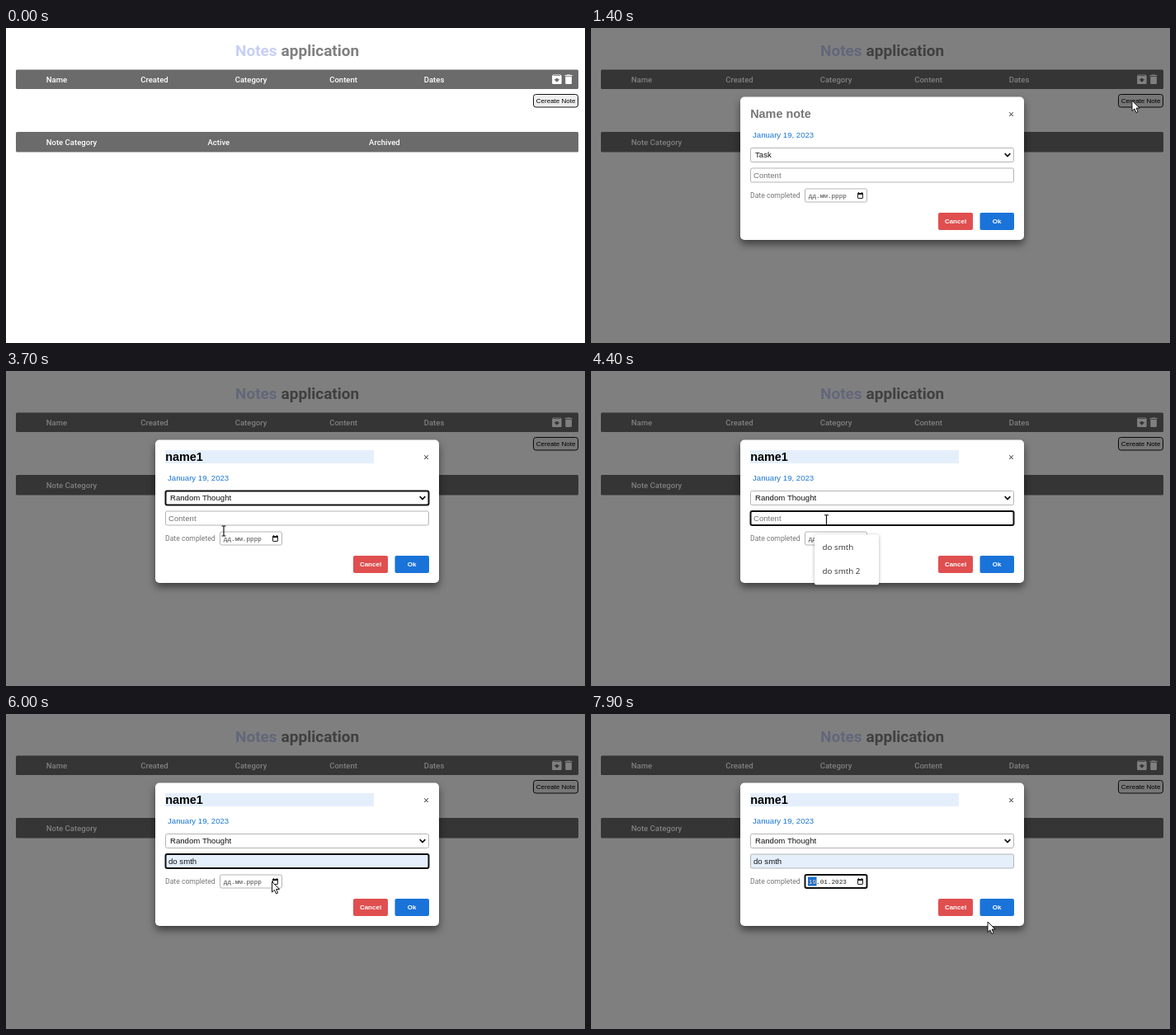
An HTML page with a canvas that plays this animation: 702 by 382 pixels, repeating every 8 s.

```html
<!DOCTYPE html>
<html lang="en">
<head>
<meta charset="utf-8">
<title>Notes application</title>
<style>
html, body { margin: 0; width: 100%; height: 100%; overflow: hidden; background: #fff; }
canvas { display: block; width: 702px; height: 382px; }
</style>
</head>
<body>
<canvas id="stage"></canvas>
<script>
const W = 702, H = 382, LOOP = 8000, STEP = 100;
const canvas = document.getElementById('stage');
const ratio = window.devicePixelRatio || 1;
canvas.width = W * ratio;
canvas.height = H * ratio;
const ctx = canvas.getContext('2d');

const ARIAL = '"Liberation Sans", Arial, sans-serif';
const ROBOTO = 'Roboto, sans-serif';
const MENU = '"Open Sans", sans-serif';
const MONO = '"Liberation Mono", monospace';
const FILLED = '#e5effc', BLUE = '#1a73d9', GREY = '#757575';

const archiveIcon = new Path2D('M20.54 5.23l-1.39-1.68C18.88 3.21 18.47 3 18 3H6c-.47 0-.88.21-1.16.55L3.46 5.23C3.17 5.57 3 6.02 3 6.5V19c0 1.1.9 2 2 2h14c1.1 0 2-.9 2-2V6.5c0-.48-.17-.93-.46-1.27zM12 17.5L6.5 12H10v-2h4v2h3.5L12 17.5zM5.12 5l.81-1h12l.94 1H5.12z');
const trashIcon = new Path2D('M6 19c0 1.1.9 2 2 2h8c1.1 0 2-.9 2-2V7H6v12zM19 4h-3.5l-1-1h-5l-1 1H5v2h14V4z');
const arrow = new Path2D('M0 0V12.6L2.9 9.9L5 14.6L7.1 13.6L5.1 9.1H9.1Z');

// Pointer stops: time, x, y
const stops = [
  [100, 440, 36], [500, 560, 118], [900, 672, 92], [1000, 663, 78], [1100, 656, 88],
  [1400, 656, 88], [1900, 330, 103], [2100, 304, 104], [2200, 304, 104], [2600, 295, 143],
  [2800, 295, 143], [3000, 292, 153], [3100, 292, 154], [3300, 284, 181], [3400, 284, 181],
  [3500, 276, 190], [3700, 264, 194], [4200, 284, 180], [4500, 286, 181], [5000, 289, 210],
  [5300, 290, 211], [5500, 292, 209], [6100, 325, 203], [6300, 326, 202], [6600, 326, 202],
  [7000, 303, 331], [7100, 303, 331], [7300, 324, 315], [7400, 324, 315], [7900, 481, 252]
];

function pointerAt(t) {
  const i = stops.findIndex(s => s[0] > t);
  if (i < 0) return stops[stops.length - 1].slice(1);
  const [t0, x0, y0] = stops[i - 1], [t1, x1, y1] = stops[i];
  const p = (t - t0) / (t1 - t0), e = p * p * (3 - 2 * p);
  return [x0 + (x1 - x0) * e, y0 + (y1 - y0) * e];
}

const within = (t, a, b) => t >= a && t < b;

function text(str, x, y, size, color, family = ARIAL, weight = 400, align = 'left') {
  ctx.font = `${weight} ${size}px ${family}`;
  ctx.textAlign = align;
  ctx.fillStyle = color;
  ctx.fillText(str, x, y);
}

function box(x, y, w, h, r, fill, stroke, line = 1) {
  ctx.beginPath();
  ctx.roundRect(x, y, w, h, r);
  if (fill) { ctx.fillStyle = fill; ctx.fill(); }
  if (stroke) { ctx.strokeStyle = stroke; ctx.lineWidth = line; ctx.stroke(); }
}

function field(x, y, w, h, fill, focused) {
  if (focused) box(x + 0.5, y + 0.5, w - 1, h - 1, 2, fill, '#101010', 2);
  else box(x + 0.5, y + 0.5, w - 1, h - 1, 2, fill, '#b4b4b4');
}

function line(points, color, width) {
  ctx.beginPath();
  points.forEach(([x, y]) => ctx.lineTo(x, y));
  ctx.strokeStyle = color;
  ctx.lineWidth = width;
  ctx.stroke();
}

function withShadow(alpha, blur, dy, draw) {
  ctx.save();
  ctx.shadowColor = `rgba(0,0,0,${alpha})`;
  ctx.shadowBlur = blur * ratio;
  ctx.shadowOffsetY = dy * ratio;
  draw();
  ctx.restore();
}

function icon(path, x, y, scale) {
  ctx.save();
  ctx.translate(x, y);
  ctx.scale(scale, scale);
  ctx.fillStyle = '#fff';
  ctx.fill(path, 'evenodd');
  ctx.restore();
}

function tableHead(y, h, labels, x0, gap) {
  box(12, y, 682, h, 1.5, '#6b6b6b');
  labels.forEach((s, i) => text(s, x0 + i * gap, y + h / 2 + 3.5, 9.55, '#fff', ROBOTO, 500));
}

function drawPage() {
  ctx.fillStyle = '#fff';
  ctx.fillRect(0, 0, W, H);
  text('Notes', 278, 33.5, 19, '#c6d0f6', ROBOTO, 700);
  text('application', 333.6, 33.5, 19, '#808080', ROBOTO, 700);
  tableHead(50.5, 23.5, ['Name', 'Created', 'Category', 'Content', 'Dates'], 48.7, 114.5);
  icon(archiveIcon, 660.2, 54.5, 0.64);
  icon(trashIcon, 674.4, 54.5, 0.64);
  box(639.5, 80.5, 54, 15.5, 3, '#efefef', '#151515');
  text('Cereate Note', 666.6, 91.2, 8, '#000', ARIAL, 400, 'center');
  tableHead(126, 24.5, ['Note Category', 'Active', 'Archived'], 48.7, 195.7);
}

function drawName(t) {
  const focused = within(t, 1900, 3100), filled = t >= 2400;
  if (focused) field(192.5, 95, 253, 18, filled ? FILLED : '#fff', true);
  else if (filled) box(193, 96, 253, 16, 0, FILLED);
  if (t < 2400) text('Name note', 193.2, 108.5, 14.4, GREY, ARIAL, 700);
  else if (t < 2700) text('name1', 194, 107, 8, '#000');
  else text('name1', 193.2, 108.5, 14.4, '#000', ARIAL, 700);
  if (within(t, 2700, 3100)) line([[239.5, 97], [239.5, 111]], '#000', 1);
}

function drawDate(t) {
  const focused = t >= 6600, done = t >= 7500;
  field(259, 194.5, 76, 17, '#fff', focused);
  if (focused) box(263, 197.5, 10.5, 11, 0, '#1a6fd0');
  const value = done ? '19.01.2023' : 'дд.мм.рррр';
  text(value, 263.8, 206, 7.7, done ? '#222' : '#444', MONO);
  if (focused) text(value.slice(0, 2), 263.8, 206, 7.7, '#fff', MONO);
  box(323.5, 200.5, 6, 6, 0.5, null, '#222');
  ctx.fillStyle = '#222';
  ctx.fillRect(323, 200, 7, 2.2);
  ctx.fillRect(324, 199, 1, 1);
  ctx.fillRect(328, 199, 1, 1);
}

function drawDialog(t) {
  ctx.fillStyle = 'rgba(0,0,0,.5)';
  ctx.fillRect(0, 0, W, H);
  withShadow(0.5, 10, 5, () => box(181, 83.5, 344, 173.5, 5, '#fff'));
  drawName(t);
  line([[507.3, 102.3], [511.7, 107]], '#222', 1);
  line([[511.7, 102.3], [507.3, 107]], '#222', 1);
  text('January 19, 2023', 196, 132.8, 9.6, '#1976d2');

  field(193, 145, 320, 18, '#fff', within(t, 3100, 4300));
  text(t < 3400 ? 'Task' : 'Random Thought', 199, 157.2, 9.6, '#111');
  line([[501.7, 152.2], [505, 155.6], [508.3, 152.2]], '#111', 1.7);

  const filled = t >= 4800;
  field(193, 169.5, 320, 18, filled ? FILLED : '#fff', within(t, 4300, 6600));
  if (!filled) text('Content', 197, 181.8, 9.6, GREY);
  else if (t < 5300) text('do smth', 197, 181.2, 8, '#000');
  else text('do smth', 197, 181.8, 9.6, '#111');

  text('Date completed', 193, 206, 8.65, '#777', ROBOTO);
  drawDate(t);
  box(421, 224, 42, 21, 2, '#e04f4f');
  box(471.5, 224, 41.5, 21, 2, BLUE);
  text('Cancel', 442, 237.3, 8, '#fff', ARIAL, 700, 'center');
  text('Ok', 492.2, 237.3, 8, '#fff', ARIAL, 700, 'center');
}

function suggestions(x, y, w, items, active, alpha) {
  ctx.save();
  ctx.globalAlpha = alpha;
  withShadow(0.3, 4, 1, () => box(x, y, w, 61, 2, '#fff'));
  if (active) box(x, y + 1, w, 28, 0, '#e6e6e6');
  items.forEach((s, i) => text(s, x + 9.5, y + 18.8 + i * 28.7, 9.8, '#333', MENU));
  ctx.restore();
}

function drawOptions(t) {
  withShadow(0.3, 4, 1, () => box(193, 163, 320, 43, 0, '#fff', '#888', 0.8));
  const active = t >= 3200 ? 1 : 0;
  box(193.5, 164 + active * 14, 319, 13.5, 0, '#1a6fd0');
  ['Task', 'Random Thought', 'Idea'].forEach((s, i) =>
    text(s, 199, 174 + i * 14, 9.6, i === active ? '#fff' : '#111'));
}

function drawCalendar(t) {
  const colX = c => 274.6 + c * 16.75, rowY = r => 265.6 + r * 16.7;
  withShadow(0.3, 4, 1, () => box(260, 213, 129.5, 167, 1, '#fff', '#c4c4c4', 0.8));
  text('січень 2023 р.', 266, 229, 7.2, '#111', ARIAL, 700);
  ctx.fillStyle = '#222';
  ctx.beginPath();
  ctx.moveTo(317.3, 225);
  ctx.lineTo(321.7, 225);
  ctx.lineTo(319.5, 228);
  ctx.fill();
  [[356, 222.5, 1], [375, 232.5, -1]].forEach(([x, tip, d]) => {
    line([[x, tip], [x, tip + 10 * d]], '#333', 1);
    line([[x - 4.3, tip + 4.3 * d], [x, tip], [x + 4.3, tip + 4.3 * d]], '#333', 1);
  });
  ['Пн', 'Вт', 'Ср', 'Чт', 'Пт', 'Сб', 'Нд'].forEach((s, c) =>
    text(s, colX(c), 250.6, 7.2, '#222', ARIAL, 400, 'center'));

  const hover = within(t, 6900, 7200) ? 25 : 0;
  for (let i = 0; i < 42; i++) {
    const n = i - 5, inMonth = n > 0 && n <= 31;
    const day = n <= 0 ? n + 31 : n > 31 ? n - 31 : n;
    const x = colX(i % 7), y = rowY(Math.floor(i / 7));
    const today = n === 19;
    if (today) box(x - 7.7, y - 7.7, 15.4, 15.4, 1.5, '#0a70ea', '#101c30', 1.2);
    else if (n === hover && inMonth) box(x - 7.7, y - 7.7, 15.4, 15.4, 1.5, '#a9cdf6', '#203858');
    text(day, x, y + 2.6, 7.2, today ? '#fff' : inMonth ? '#222' : '#858585',
      ARIAL, today ? 700 : 400, 'center');
  }
  text('Очистити', 272.8, 370, 7.2, '#1a6fd0');
  text('Сьогодні', 377.2, 370, 7.2, '#1a6fd0', ARIAL, 400, 'right');
}

function drawPointer(t) {
  const [x, y] = pointerAt(t);
  const menuOpen = within(t, 2300, 3500) || within(t, 4700, 5500) || t >= 6600;
  const overName = x > 193 && x < 445 && y > 95 && y < 113;
  const overText = x > 193 && x < 320 && y > 168 && y < 212;
  if (t >= 1400 && !menuOpen && (overName || overText)) {
    line([[x - 2.5, y - 6], [x + 2.5, y - 6]], '#111', 1);
    line([[x, y - 6], [x, y + 6]], '#111', 1.2);
    line([[x - 2.5, y + 6], [x + 2.5, y + 6]], '#111', 1);
    return;
  }
  ctx.save();
  ctx.translate(x, y);
  ctx.fillStyle = '#fff';
  ctx.strokeStyle = '#111';
  ctx.lineWidth = 1;
  ctx.fill(arrow);
  ctx.stroke(arrow);
  ctx.restore();
}

function draw(t) {
  ctx.setTransform(ratio, 0, 0, ratio, 0, 0);
  drawPage();
  if (t >= 1400) drawDialog(t);
  if (within(t, 2000, 2900))
    suggestions(272, 123.5, 56, ['name1', 'name2'], t >= 2400, t >= 2800 ? 0.6 : 1);
  if (within(t, 3100, 3400)) drawOptions(t);
  if (within(t, 4400, 5400))
    suggestions(271, 198.3, 78, ['do smth', 'do smth 2'], t >= 4800, t >= 5300 ? 0.6 : 1);
  if (within(t, 6600, 7500)) drawCalendar(t);
  if (t >= 100) drawPointer(t);
}

const start = performance.now();
function tick() {
  const t = (performance.now() - start) % LOOP;
  draw(Math.floor(t / STEP) * STEP);
  requestAnimationFrame(tick);
}
tick();
</script>
</body>
</html>
```
